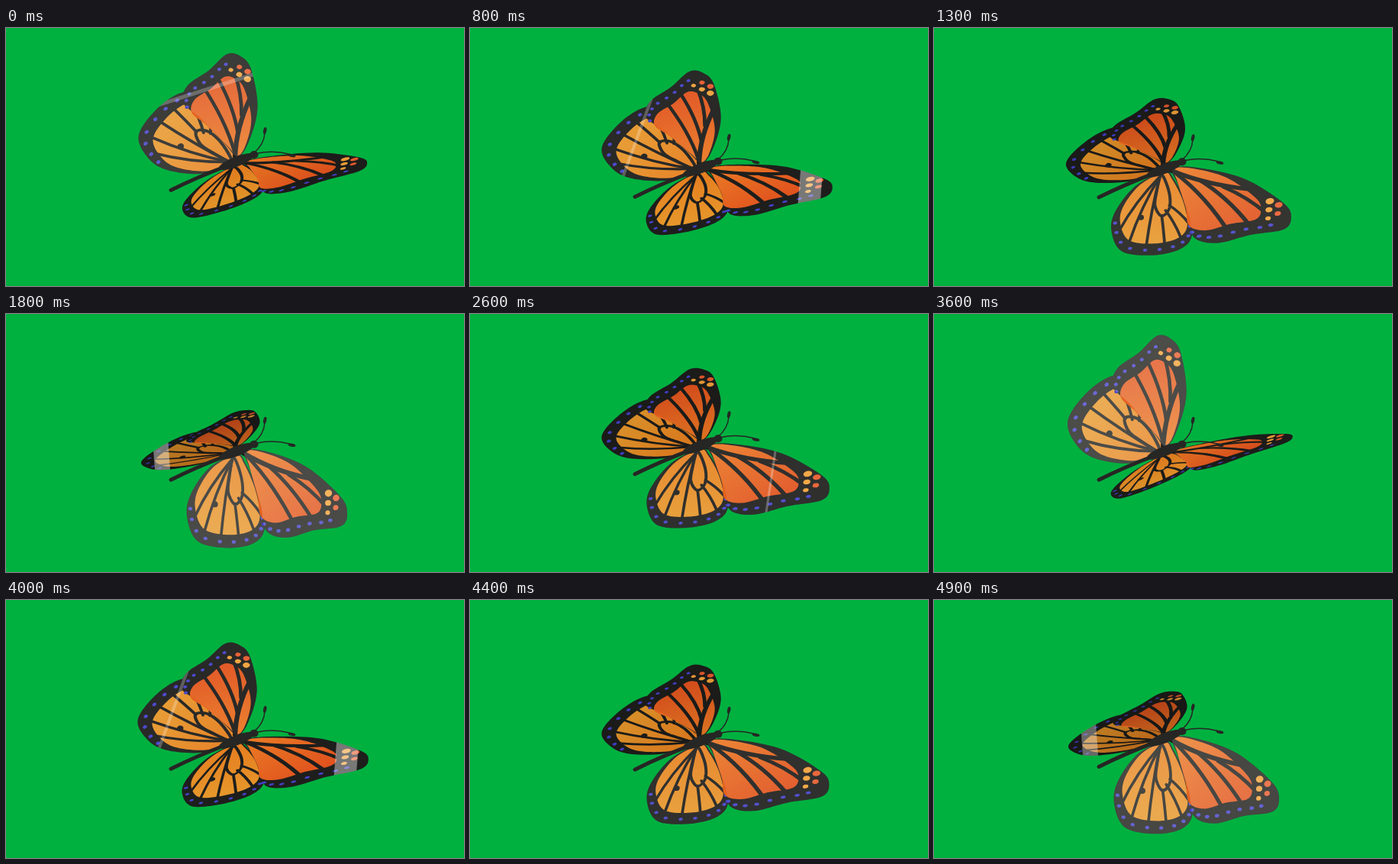
An HTML page with a canvas for the animation above (5000 ms loop, 600 by 338 pixels).

```html
<!DOCTYPE html>
<html lang="en">
<head>
<meta charset="utf-8">
<title>Butterfly</title>
<style>
  html, body { margin: 0; width: 100%; height: 100%; overflow: hidden; background: #00b140; }
  canvas { display: block; width: 600px; height: 338px; }
</style>
</head>
<body>
<canvas id="stage" width="600" height="338"></canvas>
<script>
const ctx = document.getElementById('stage').getContext('2d');
const LOOP = 5000, BEAT = 3200, STEP = 100;
const DARK = '#1d1d1b', BLUE = '#4340c8', RED = '#e65a2c', GOLD = '#f0a038';

// Each kind of wing is drawn once, then mapped onto both sides by three anchors.
const fore = makeArt({
  anchors: [313, 180, 447, 270, 370, 293],
  edge: [[313, 179], [342, 181], [392, 201], [437, 240], [447, 262], [440, 279],
    [405, 284], [370, 293], [344, 283], [336, 250], [320, 203]],
  pivot: [318, 184], inset: [.74, .82], dots: [5, 8, 8],
  colors: ['#ea7a24', '#df4c1c'], detail: foreDetail
});
const hind = makeArt({
  anchors: [300, 184, 233, 265, 325, 297],
  edge: [[302, 184], [265, 201], [238, 237], [233, 267], [246, 297], [285, 306],
    [320, 300], [335, 280], [330, 238], [314, 197]],
  pivot: [300, 192], inset: [.83, .85], dots: [2.7, 7.2, 10],
  colors: ['#e67c1e', '#e6962a'], detail: hindDetail
});

// Anchors at mid stroke: x, y and how far the point follows the flap
const wings = [
  { art: hind, left: true, root: [300, 180], tip: [187, 187, .34], lobe: [233, 118, .88] },
  { art: fore, left: true, root: [303, 171.5], tip: [299, 77, 1.13], lobe: [236, 114, 1] },
  { art: hind, left: false, root: [300, 183], tip: [232, 258, .3], lobe: [328, 274, .92] },
  { art: fore, left: false, root: [313, 178.8], tip: [470, 242, 1.08], lobe: [372, 269, .97] }
];

const glints = [
  { time: 0, x: 255, y: 83, angle: -.31, width: 5, alpha: .25 },
  { time: 800, x: 446, y: 207, angle: 1.65, width: 29, alpha: .4 },
  { time: 800, x: 216, y: 152, angle: 1.92, width: 4, alpha: .25 },
  { time: 1760, x: 204, y: 190, angle: 1.5, width: 20, alpha: .55 },
  { time: 2600, x: 394, y: 220, angle: 1.72, width: 3, alpha: .28 }
];

// Point on a closed Catmull-Rom curve; u counts key points
function along(points, u) {
  const n = points.length, i = Math.floor(u), f = u - i;
  const [a, b, c, d] = [-1, 0, 1, 2].map(k => points[(i + k + n) % n]);
  return [0, 1].map(k => b[k] + f / 2 * (c[k] - a[k]
    + f * (2 * a[k] - 5 * b[k] + 4 * c[k] - d[k] + f * (3 * (b[k] - c[k]) + d[k] - a[k]))));
}

function smooth(points) {
  const path = new Path2D();
  for (let u = 0; u < points.length; u += .1) path.lineTo(...along(points, u));
  path.closePath();
  return path;
}

function frameOf(ox, oy, px, py, qx, qy) {
  return new DOMMatrix([px - ox, py - oy, qx - ox, qy - oy, ox, oy]);
}

function makeArt(art) {
  // Outline drawn in towards the pivot: k = 1 reaches the orange panel
  const shrink = k => art.edge.map(p =>
    p.map((v, i) => art.pivot[i] + (v - art.pivot[i]) * (1 - k * (1 - art.inset[i]))));
  art.outline = smooth(art.edge);
  art.panel = smooth(shrink(1));
  art.inverse = frameOf(...art.anchors).inverse();
  const [from, to, count] = art.dots, rim = shrink(.45);
  art.rim = Array.from({ length: count }, (_, i) => along(rim, from + (to - from) * i / (count - 1)));
  const [ox, oy, px, py, qx, qy] = art.anchors;
  art.paint = ctx.createLinearGradient(ox, oy, (px + qx) / 2, (py + qy) / 2);
  art.colors.forEach((color, i) => art.paint.addColorStop(i, color));
  return art;
}

const mix = (a, b, k) => a + (b - a) * k;

function oval(x, y, rx, ry, color, turn = 0) {
  ctx.fillStyle = color;
  ctx.beginPath();
  ctx.ellipse(x, y, rx, ry, turn, 0, Math.PI * 2);
  ctx.fill();
}

function curve(width, x1, y1, cx, cy, x2, y2) {
  ctx.lineWidth = width;
  ctx.beginPath();
  ctx.moveTo(x1, y1);
  ctx.quadraticCurveTo(cx, cy, x2, y2);
  ctx.stroke();
}

function foreDetail() {
  curve(6, 311, 182, 350, 206, 400, 217);
  // Three veins branch off the main one
  for (let i = 0; i < 3; i++) {
    const x = mix(316, 370, i / 2), y = mix(186, 211, i / 2);
    const endX = mix(382, 420, i / 2), endY = mix(280, 254, i / 2);
    curve(4.6, x, y, mix(x, endX, .55), mix(y, endY, .4), endX, endY);
  }
  for (let i = 0; i < 5; i++) {
    oval(422 + i % 2 * 10, 236 + i * 6.3, 4.6 - i * .4, 4.6 - i * .4, i % 2 ? RED : GOLD);
  }
}

const loopCell = smooth([[298, 188], [291, 214], [289, 234], [297, 249], [307, 238], [307, 214]]);

function hindDetail() {
  // Veins fan out from the root, the later ones from the closed cell
  for (let i = 0; i < 6; i++) {
    const a = mix(2.88, .17, i / 5);
    const endX = 286 + 45 * Math.cos(a), endY = 255 + 41 * Math.sin(a);
    const x = i < 3 ? 296 : 297 + (i - 3) * 5, y = i < 3 ? 190 : 248 - (i - 3) * 7;
    curve(3.6, x, y, mix(x, endX, .6), mix(y, endY, .45), endX, endY);
    if (i === 1) oval(mix(x, endX, .62), mix(y, endY, .62), 4, 4, DARK);
  }
  ctx.lineWidth = 3.8;
  ctx.stroke(loopCell);
}

// s runs from about -1.4 (wings up) to 1.1 (wings down)
function anchor(wing, [x, y, reach], s) {
  return wing.left
    ? [x + reach * (3 * s + 5 * s * s), y + reach * (39 * s + 3.5 * s * s)]
    : [x - reach * (x - 340) * (.09 * s + .075 * s * s), y + reach * (38.5 * s - 15 * s * s)];
}

function drawWing(wing, s, bob) {
  const art = wing.art;
  const map = frameOf(...wing.root, ...anchor(wing, wing.tip, s), ...anchor(wing, wing.lobe, s))
    .multiply(art.inverse);
  ctx.save();
  ctx.translate(0, bob);
  ctx.transform(map.a, map.b, map.c, map.d, map.e, map.f);
  ctx.fillStyle = DARK;
  ctx.fill(art.outline);
  ctx.fillStyle = art.paint;
  ctx.fill(art.panel);
  ctx.strokeStyle = DARK;
  ctx.lineCap = 'round';
  art.detail();
  art.rim.forEach(([x, y]) => oval(x, y, 2.7, 2.3, BLUE));
  // The side facing the viewer catches the light
  const light = wing.left ? -.1 - .24 * s : .08 + .12 * s;
  ctx.fillStyle = light > 0 ? `rgba(255,255,245,${light})` : `rgba(0,0,0,${-light * .6})`;
  ctx.fill(art.outline);
  ctx.restore();
}

function drawGlints(t) {
  ctx.save();
  ctx.globalCompositeOperation = 'source-atop';
  for (const g of glints) {
    const gap = Math.abs((t - g.time + BEAT * 1.5) % BEAT - BEAT / 2);
    ctx.save();
    ctx.translate(g.x, g.y);
    ctx.rotate(g.angle);
    ctx.fillStyle = `rgba(255,255,255,${g.alpha * Math.max(0, 1 - gap / 160)})`;
    ctx.fillRect(-80, -g.width / 2, 160, g.width);
    ctx.restore();
  }
  ctx.restore();
}

function drawBody(bob) {
  const color = '#262624';
  ctx.save();
  ctx.translate(0, bob);
  ctx.strokeStyle = color;
  ctx.lineCap = 'round';
  curve(5, 216, 216, 250, 199, 290, 184);
  oval(302, 178.5, 25, 6.5, color, -.38);
  oval(325, 169.5, 5.5, 5, color);
  curve(1.5, 325, 167, 338, 156, 339, 141);
  curve(1.5, 328, 168, 350, 163, 372, 169);
  oval(339.2, 138, 2.1, 4.6, color, .2);
  oval(374.5, 170.6, 5, 2, color, .2);
  ctx.restore();
}

function draw(t) {
  const turn = 2 * Math.PI / BEAT;
  const bob = 6.3 * Math.cos(turn * (t - 1100));
  // Nearly linear flap, softened where it reverses
  const s = -.15 - .85 * Math.asin(.993 * Math.cos(turn * (t - 290)));
  ctx.clearRect(0, 0, 600, 338);
  wings.forEach(w => drawWing(w, s, bob));
  drawGlints(t);
  drawBody(bob);
}

const start = performance.now();
function tick() {
  const t = (performance.now() - start) % LOOP;
  draw(Math.floor(t / STEP) * STEP);
  requestAnimationFrame(tick);
}
tick();
</script>
</body>
</html>
```
